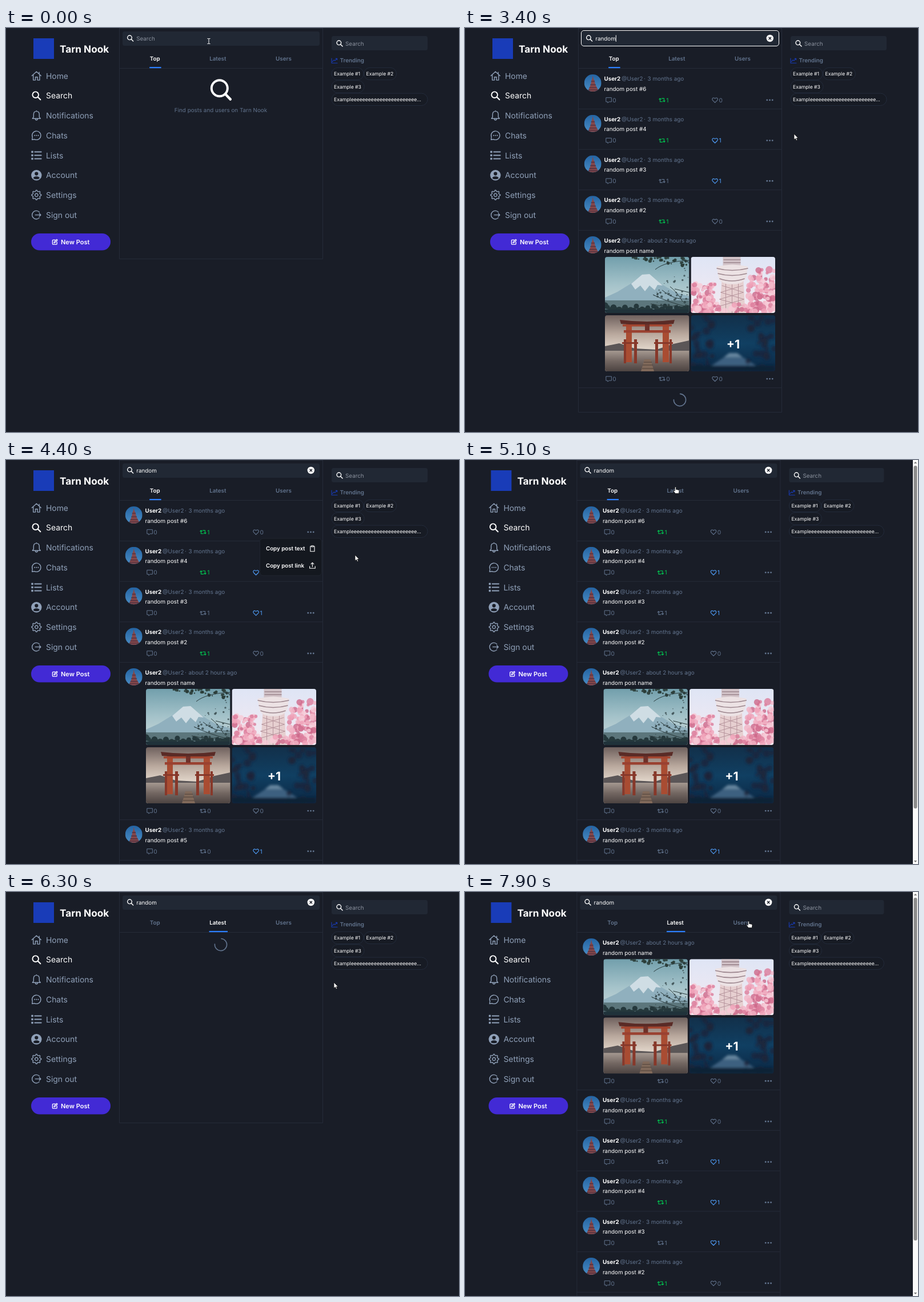
These frames come from a looping animation (793x706 px, 8 s). An HTML page:

```html
<!DOCTYPE html>
<html lang="en">
<head>
<meta charset="utf-8">
<title>Search page</title>
<style>
html, body { margin: 0; width: 100%; height: 100%; overflow: hidden; background: #191d27; }
svg { display: block; }
text { font: 9.85px Inter, "Open Sans", sans-serif; fill: #fff; text-rendering: geometricPrecision; white-space: pre; }
.line { fill: none; stroke: currentColor; stroke-linecap: round; stroke-linejoin: round; }
.solid { fill: currentColor; }
.rule { fill: none; stroke: #252b38; }
.muted { color: #62748e; }
.nav { color: #90a1b9; }
.white { color: #fff; }
.green { color: #00c951; }
.blue { color: #51a2ff; }
.trend { color: #193cb8; }
text.muted, text.nav, text.green, text.blue { fill: currentColor; }
</style>
</head>
<body>
<svg id="stage" width="793" height="706" viewBox="0 0 793 706"></svg>
<script>
const LOOP = 8000, STEP = 100;
const BRAND = "Tarn Nook", USER = "User2";
let seed = 7;
const rnd = (a, b) => {
  seed = (seed * 16807) % 2147483647;
  return a + (b - a) * seed / 2147483647;
};
const many = (n, f) => Array.from({ length: n }, (_, i) => f(i)).join("");

// Text centred vertically on its capitals
const text = (x, cy, str, o = {}) => {
  const { size = 9.85, weight = 400, cls = "", anchor = "start", fill } = o;
  const style = `font-size:${size}px;font-weight:${weight}` + (fill ? `;fill:${fill}` : "");
  return `<text x="${x}" y="${cy + size * 0.364}" class="${cls}" text-anchor="${anchor}" style="${style}">${str}</text>`;
};
const at = (x, y, body, attr = "") => `<g transform="translate(${x} ${y})" ${attr}>${body}</g>`;
const line = (d, w = 1.4) => `<path class="line" stroke-width="${w}" d="${d}"/>`;
const ring = (r, w = 1.4, x = 0, y = 0) => `<circle class="line" cx="${x}" cy="${y}" r="${r}" stroke-width="${w}"/>`;
const dot = (x, y, r) => `<circle class="solid" cx="${x}" cy="${y}" r="${r}"/>`;
const rect = (x, y, w, h, fill, rx = 0, extra = "") =>
  `<rect x="${x}" y="${y}" width="${w}" height="${h}" rx="${rx}" fill="${fill}" ${extra}/>`;
const poly = (pts, fill) => `<polygon points="${pts}" fill="${fill}"/>`;
const blob = (x, y, r, fill, o = 1) =>
  `<circle cx="${x.toFixed(1)}" cy="${y.toFixed(1)}" r="${r.toFixed(1)}" fill="${fill}" opacity="${o}"/>`;
const grad = (id, ...stops) => `<linearGradient id="${id}" x2="0" y2="1">` +
  stops.map((c, i) => `<stop offset="${i / (stops.length - 1)}" stop-color="${c}"/>`).join("") + "</linearGradient>";

const cog = "M" + many(32, i => {
  const r = i % 4 < 2 ? 8.4 : 6.5, a = (i - 0.5) * Math.PI / 16;
  return `${(r * Math.sin(a)).toFixed(2)},${(-r * Math.cos(a)).toFixed(2)} `;
}) + "Z";

const icons = {
  home: line("M-8 0L0 -7.3 8 0M-5.6 -2V7.5H-1.8V2.2H1.8V7.5H5.6V-2M4.8 -6.5V-3.2"),
  search: ring(5.3, 1.9, -1.6, -1.6) + line("M2.5 2.5L7 7", 2.1),
  bell: line("M-7 5.2H7L5 2.6V-2C5 -5.8 2.6 -7.4 0 -7.4S-5 -5.8 -5 -2V2.6ZM-2 5.6C-2 8.4 2 8.4 2 5.6M0 -8.4V-7.4"),
  chat: line("M-7.6 7.5L-7 3A7.6 7.6 0 1 1 -3.4 6.8Z") + dot(-3.2, 0, 1.05) + dot(0, 0, 1.05) + dot(3.2, 0, 1.05),
  list: many(3, i => rect(-9, i * 6 - 7.7, 3.4, 3.4, "currentColor", 0.6) + line(`M-3 ${i * 6 - 6}H8.4`, 1.9)),
  user: dot(0, 0, 9.2) + `<g fill="#191d27"><circle cy="-2.6" r="3.1"/><path d="M-5.6 5.2C-4.6 .9 4.6 .9 5.6 5.2 3 7.8 -3 7.8 -5.6 5.2Z"/></g>`,
  gear: line(cog) + ring(2.7),
  exit: line("M5 -5A7.3 7.3 0 1 0 5 5M-2 0H7.6M5 -2.6L7.6 0 5 2.6"),
  edit: line("M.6 -3.6H-2.8Q-4 -3.6 -4 -2.4V3Q-4 4.2 -2.8 4.2H2.6Q3.8 4.2 3.8 3V0M-1.4 1.6L-1 -.4 3.4 -4.6 4.6 -3.4 .4 1Z", 1.3),
  trend: line("M-5 -4V4.2H5M-3.6 1.6L-.8 -1.2 .8 .2 4.4 -3.6M2 -3.8H4.6V-1.2", 1.1),
  comment: line("M-4.6 -4.2H4.6V3H.4L-2 5V3H-4.6Z", 1),
  repost: line("M-5.2 -1.2L-3.5 -2.9 -1.8 -1.2M-3.5 -2.8V2.8H.6M5.2 1.2L3.5 2.9 1.8 1.2M3.5 2.8V-2.8H-.6", 1.1),
  heart: line("M0 4.4L-4 .4C-6.4 -2.4 -2.6 -5.8 0 -2.6 2.6 -5.8 6.4 -2.4 4 .4Z", 1.1),
  dots: dot(-4.7, 0, 1.45) + dot(0, 0, 1.45) + dot(4.7, 0, 1.45),
  clip: line("M-1.6 -4H-3.6V5H3.6V-4H1.6M-1.6 -5H1.6V-3H-1.6Z", 1.1),
  share: line("M-4.8 1.4V4.8H4.8V1.4M0 2V-4.8M-2.4 -2.6L0 -5 2.4 -2.6", 1.1),
};
const icon = (name, x, y, cls, scale = 1) =>
  `<g class="${cls}" transform="translate(${x} ${y}) scale(${scale})">${icons[name]}</g>`;

const fuji = rect(0, 0, 147.5, 98, "url(#day)") +
  poly("0,71 22,61 48,45 65,31 78,30 96,46 122,61 147.5,69 147.5,92 0,92", "#90b0be") +
  poly("46,47 65,31 78,30 101,50 92,49 87,58 78,50 70,60 62,50 53,57", "#cfdde4") +
  rect(0, 76, 147.5, 22, "#5c767c") + many(30, i => blob(i * 5, rnd(85, 95), rnd(3, 6), "#25383c")) +
  rect(0, 92, 147.5, 6, "#20323a") +
  many(46, () => { const x = rnd(48, 147); return blob(x, rnd(0, (x - 35) / 6), rnd(1, 3), "#2b3c38", 0.9); }) +
  many(50, () => { const x = rnd(84, 147); return blob(x, rnd(150 - x, 92), rnd(0.7, 2.2), "#2c3d3f", 0.7); }) +
  `<g stroke="#2a3a3c" fill="none"><path d="M147 6Q105 8 88 22M147 88Q112 80 84 66M147 74Q120 76 100 58M128 84Q112 90 80 82M136 78Q125 60 114 52M147 62L122 56"/></g>`;

const pinks = ["#f0a3ba", "#dd7c9b", "#f8cbd7", "#cf6a8b", "#f3b5c6"];
const petals = (n, x0, x1, y0) => many(n, i => blob(rnd(x0, x1), rnd(y0, 98), rnd(2.5, 6.5), pinks[i % 5], 0.8));
const tower = rect(0, 0, 147.5, 98, "url(#pale)") +
  poly("54,42 92,42 95,98 50,98", "#e6cfd0") +
  `<path d="M54 50L92 62 50 74 94 86M91 50L52 62 93 74 50 86M61 40V98M72 40V98M83 40V98" stroke="#b5939b" fill="none"/>` +
  rect(56, 0, 31, 18, "#d2c3c8") +
  `<path d="M45 17Q72 10 100 17L97 34Q94 48 72 48T48 34Z" fill="#ece2e4"/>` +
  `<path d="M45 20Q72 27 100 20M47 29Q72 36 98 29M50 38Q72 46 94 38M57 5H87M57 10H87" fill="none" stroke="#9c868e" stroke-width="1.7"/>` +
  petals(75, 0, 42, 46) + petals(75, 100, 147, 32) + petals(30, 118, 147, 20) + petals(35, 25, 120, 82);

const posts = [[37, 10], [101, 11], [33, 4], [51, 5], [88, 5], [113, 4]];
const gate = rect(0, 0, 147.5, 98, "url(#dusk)") +
  poly("0,54 25,49 52,58 90,60 120,50 147.5,44 147.5,64 0,64", "#5b5657") +
  rect(0, 62, 147.5, 36, "url(#lake)") +
  posts.map(([x, w], i) => i < 2 ? rect(x, 14, w, 68, "#a94c32") : rect(x, 42, w, 42, "#87382a")).join("") +
  `<path d="M26 8Q74 14 122 8L120 15Q74 19 28 15Z" fill="#5a2b26"/>` +
  rect(31, 16, 86, 3.5, "#a3452f") + rect(33, 26, 82, 4.5, "#9a4131") + rect(70, 16, 8, 11, "#6f3129") +
  rect(30, 47, 28, 3, "#87382a") + rect(86, 47, 33, 3, "#87382a") +
  poly("69,77 80,77 86,98 63,98", "#80695a") + `<path d="M68 82H82M66 87H84M65 93H85" stroke="#4d4038"/>`;

const night = rect(0, 0, 147.5, 98, "url(#deep)") +
  `<g filter="url(#soft)">${poly("36,88 66,68 82,68 114,88", "#3c6080")}${poly("58,73 67,66 81,66 90,73", "#66869f")}` +
  many(56, i => blob(i % 2 ? rnd(0, 42) : rnd(98, 147), rnd(0, 98), rnd(3, 7), "#1e2438", 0.75)) +
  rect(0, 88, 147.5, 10, "#0f2034") + "</g>" +
  text(74, 50.5, "+1", { size: 21, weight: 700, anchor: "middle" });

const tile = (x, y, body) => at(x, y, body, 'clip-path="url(#tile)"');
const defs = `<defs>
${grad("day", "#729fac", "#a5c3ca", "#cddadb")}${grad("pale", "#dfe5f5", "#f5eaf1")}
${grad("dusk", "#6f615e", "#b9a89d", "#eadfd3", "#d8c6b8")}${grad("lake", "#a49890", "#736762", "#4c4341")}
${grad("deep", "#12304a", "#103f62", "#0b2743")}${grad("sky", "#2464a3", "#4a8dc4")}
<clipPath id="tile"><rect width="147.5" height="98" rx="4"/></clipPath>
<clipPath id="face"><circle r="15"/></clipPath>
<filter id="soft"><feGaussianBlur stdDeviation="2"/></filter>
<g id="avatar" clip-path="url(#face)"><rect x="-15" y="-15" width="30" height="30" fill="url(#sky)"/>
<path d="M0 -13L1.2 -7 3 -4 4.4 3 11 15H-9L-3.6 3 -2.4 -4 -1 -7Z" fill="#85474a"/><path d="M-3 -3H3.4M-4.5 3H5.4M-6 8H7M-7.5 12H9" stroke="#4c3040" stroke-width="1.3"/><path d="M-15 12.5H-7L-5 15H-15ZM9 12H15V15H9Z" fill="#273648"/></g>
<g id="shots">${tile(245, 0, fuji)}${tile(395.5, 0, tower)}${tile(245, 102, gate)}${tile(395.5, 102, night)}</g>
</defs>`;

const ROW = 70.7, TALL = 275.1;
const stat = (name, x, y, n, cls, gap) => icon(name, x, y, cls) + text(x + gap, y, n, { size: 10.2, cls });

// One post: label, reposts, own repost, likes
const post = (y, [label, reposts, mine, likes]) => {
  const tall = label === "name", h = tall ? TALL : ROW, base = y + h - 15.6;
  const age = tall ? "about 2 hours ago" : "3 months ago";
  return `<use href="#avatar" x="223.7" y="${y + 25.3}"/>` +
    text(243.5, y + 18, USER, { weight: 700 }) + text(274, y + 18, "@" + USER, { cls: "muted" }) +
    text(313, y + 18, "·", { cls: "muted" }) + text(319.6, y + 18, age, { cls: "muted" }) +
    text(243.5, y + 35.4, "random post " + (tall ? label : "#" + label)) +
    (tall ? `<use href="#shots" y="${y + 46.4}"/>` : "") +
    stat("comment", 251.8, base, 0, "muted", 6.4) +
    stat("repost", 345, base, reposts, mine ? "green" : "muted", 7.2) +
    stat("heart", 437.6, base, likes, likes ? "blue" : "muted", 6.8) +
    icon("dots", 533.5, base, "muted") +
    `<path class="rule" d="M198.5 ${y + h}H554.5"/>`;
};
const feed = list => {
  let y = 70.8;
  return list.map(p => { const s = post(y, p); y += p[0] === "name" ? TALL : ROW; return s; });
};
const data = { 6: [6, 1, 1, 0], 5: [5, 0, 0, 1], 4: [4, 1, 1, 1], 3: [3, 1, 0, 1], 2: [2, 1, 1, 0], name: ["name", 0, 0, 0] };
const feedGroup = (id, order) => {
  const rows = feed(order.map(k => data[k]));
  return `<g id="${id}">${rows.slice(0, 5).join("")}<g id="${id}More">${rows[5]}</g></g>`;
};

const menuItems = [["home", "Home"], ["search", "Search"], ["bell", "Notifications"], ["chat", "Chats"],
  ["list", "Lists"], ["user", "Account"], ["gear", "Settings"], ["exit", "Sign out"]];
const sidebar = rect(48, 18, 36, 36, "#193cb8") + text(94, 37, BRAND, { size: 17.2, weight: 700 }) +
  menuItems.map(([name, label], i) => {
    const y = 83.6 + i * 34.72, cls = name === "search" ? "white" : "nav";
    return icon(name, 53.3, y, cls) + text(70, y, label, { size: 13.9, cls });
  }).join("") +
  rect(44, 359, 139, 29.6, "#422ad5", 14.8) + icon("edit", 85.4, 374, "white") +
  text(96, 373.7, "New Post", { size: 11, weight: 600 });

const chip = (x, y, w, label) => rect(x, y - 10.6, w, 21.2, "#171b24", 10.6, 'stroke="#232b3b"') +
  text(x + 4, y, label, { size: 8.65 });
const aside = `<rect id="asideBox" x="570" y="14" width="168" height="25" rx="3.5" fill="#212834"/>` +
  icon("search", 584, 27, "white", 0.72) + text(594, 27, "Search", { fill: "#8b929e" }) +
  icon("trend", 575, 57, "trend") + text(584.6, 56.8, "Trending", { weight: 600, cls: "muted" }) +
  chip(570, 80, 56, "Example #1") + chip(626.5, 80, 57, "Example #2") + chip(570, 102.4, 57, "Example #3") +
  `<g id="longChip">${chip(570, 124.8, 168, "Exampl" + "e".repeat(23) + "...")}</g>`;

const tabs = [["Top", 260.8], ["Latest", 370.8], ["Users", 486]].map(([label, x]) =>
  `<g id="tab${label}">${text(x, 53, label, { weight: 600, anchor: "middle" })}</g>`).join("");
const header = rect(204, 6, 345, 25, "#212834", 3.5) +
  `<rect id="focus" x="203.5" y="4.5" width="346" height="27" rx="4.5" fill="none" stroke="#fff"/>` +
  icon("search", 217.6, 18, "white", 0.72) +
  `<g id="hint">${text(228.2, 18, "Search", { fill: "#8b929e" })}</g><g id="query">${text(228.2, 18, "")}</g>` +
  `<path id="caret" d="M0 12.5V24" stroke="#fff"/>` +
  `<g id="clear"><circle cx="533.8" cy="18" r="6.2" fill="#fff"/><path d="M531.6 15.8L536 20.2M536 15.8L531.6 20.2" stroke="#191d27" stroke-width="1.4"/></g>` +
  tabs + `<path class="rule" d="M198.5 70.5H554.5"/><rect id="bar" y="68" height="2.2" fill="#2b7fff"/>`;

const popup = `<g id="popup">${rect(444.5, 137, 108, 65, "#14181f", 5.5, 'stroke="#20252f"')}` +
  text(455, 154.7, "Copy post text", { size: 9.75, weight: 600 }) + icon("clip", 536.4, 154.7, "white") +
  text(455, 184.4, "Copy post link", { size: 9.75, weight: 600 }) + icon("share", 536.4, 184.4, "white") + "</g>";

const scrollbar = `<g id="scroll">${rect(784, 0, 9, 706, "#fafafa")}${rect(785.5, 10, 6, 599, "#8c8c8c", 3)}` +
  poly("785.8,6 791.2,6 788.5,3", "#777") + poly("785.8,700 791.2,700 788.5,703", "#777") + "</g>";

const cursors = `<g id="cursor">
<path id="beam" d="M-2.5 -4.5H-.6L0 -4 .6 -4.5H2.5M0 -4V4M-2.5 4.5H-.6L0 4 .6 4.5H2.5" fill="none" stroke="#fff"/>
<path id="arrow" d="M0 0V10.2L2.4 8 4 11.6 5.7 10.8 4.1 7.4H7.2Z" fill="#fff" stroke="#111" stroke-width=".8"/>
<path id="hand" d="M-2.6 -4.6Q-2.6 -6 -1.6 -6T-.5 -4.6V-1.6L3.6 -.8Q5 -.4 5 1L4.3 5.6H-1.6L-5 1.4Q-5 -.2 -2.6 .9Z" fill="#fff" stroke="#111" stroke-width=".8"/>
</g>`;

document.getElementById("stage").innerHTML = defs + rect(0, 0, 793, 706, "#191d27") +
  `<g id="page">${sidebar}<path id="frame" class="rule"/>${header}
  <g id="prompt">${at(376, 108, ring(14, 4, -2.2, -2.8) + line("M8 7.5L16.8 16.6", 4.4), 'class="white"')}
  ${text(376, 143.5, "Find posts and users on " + BRAND, { cls: "muted", anchor: "middle" })}</g>
  ${feedGroup("top", [6, 4, 3, 2, "name", 5])}${feedGroup("latest", ["name", 6, 5, 4, 3, 2])}
  <g id="spin" class="muted">${line("M-7.5 7.5A10.6 10.6 0 1 1 7.5 7.5", 1.6)}</g>${popup}${aside}</g>${scrollbar}${cursors}`;

const $ = id => document.getElementById(id);
const show = (id, on) => { $(id).style.display = on ? "" : "none"; };
const set = (id, attrs) => { for (const k in attrs) $(id).setAttribute(k, attrs[k]); };
const within = (t, a, b) => t >= a && t < b;

// Pointer path: time, x, y
const path = [[0, 355, 23], [200, 355, 23], [300, 358, 52], [900, 358, 52], [1400, 596, 216], [3300, 596, 216],
  [3400, 576, 185], [3600, 531, 127], [3900, 531, 127], [4300, 611, 166], [4600, 611, 166], [5100, 370, 53],
  [5500, 370, 53], [6100, 574, 158], [7500, 574, 158], [7900, 498, 57], [8000, 498, 57]];
const pointer = t => {
  const i = path.findIndex(p => p[0] > t), [t0, x0, y0] = path[i - 1], [t1, x1, y1] = path[i];
  const k = (t - t0) / (t1 - t0);
  return [x0 + (x1 - x0) * k, y0 + (y1 - y0) * k];
};

function draw(t) {
  const latest = t >= 5400;
  const loaded = latest ? t >= 6600 : t >= 2300;
  const full = latest ? t >= 7100 : t >= 3500;
  const locked = within(t, 3800, 4600);
  const scroll = full && !locked;
  const focused = within(t, 300, 3800);
  const query = "random".slice(0, Math.max(0, Math.floor((t - 900) / STEP)));

  set("page", { transform: `translate(${scroll ? -2.6 : 0} 0)` });
  show("scroll", scroll);
  const boxWidth = scroll ? 166 : 168;
  set("asideBox", { width: boxWidth });
  $("longChip").firstChild.setAttribute("width", boxWidth);

  show("focus", focused);
  show("hint", !query);
  show("clear", query);
  $("query").firstChild.textContent = query;
  const typed = query ? $("query").firstChild.getComputedTextLength() : 0;
  set("caret", { transform: `translate(${228.7 + typed} 0)` });
  show("caret", focused && (within(t, 900, 1600) || (t + 200) % 1000 >= 500));

  const waiting = t >= 1500 && !full;
  show("prompt", t < 1500);
  show("top", !latest && loaded);
  show("latest", latest && loaded);
  show("topMore", full);
  show("latestMore", full);
  show("spin", waiting);
  const turn = latest ? 320 + (t - 6300) * 0.36 : 174 + (t - 2000) * 0.36;
  set("spin", { transform: `translate(376 ${loaded ? 650 : 92}) rotate(${turn - 180})` });
  const bottom = full ? 720 : loaded ? 671.5 : 403.5;
  set("frame", { d: `M198.5 0V${bottom}H554.5V0M198.5 .5H554.5` });

  for (const label of ["Top", "Latest", "Users"]) {
    const on = label === (latest ? "Latest" : "Top");
    $("tab" + label).firstChild.style.fill = on ? "#fff" : "#62748e";
  }
  set("bar", latest ? { x: 355.6, width: 32.4 } : { x: 251.2, width: 20.4 });
  show("popup", locked);

  const [x, y] = pointer(t);
  const beam = x < 549 && y < 31;
  const hand = !beam && x < 554 && (y < 70 || within(t, 3500, 4000));
  set("cursor", { transform: `translate(${x} ${y})` });
  show("beam", beam);
  show("hand", hand);
  show("arrow", !beam && !hand);
}

function tick() {
  draw(Math.floor(performance.now() % LOOP / STEP) * STEP);
  requestAnimationFrame(tick);
}
tick();
</script>
</body>
</html>
```
